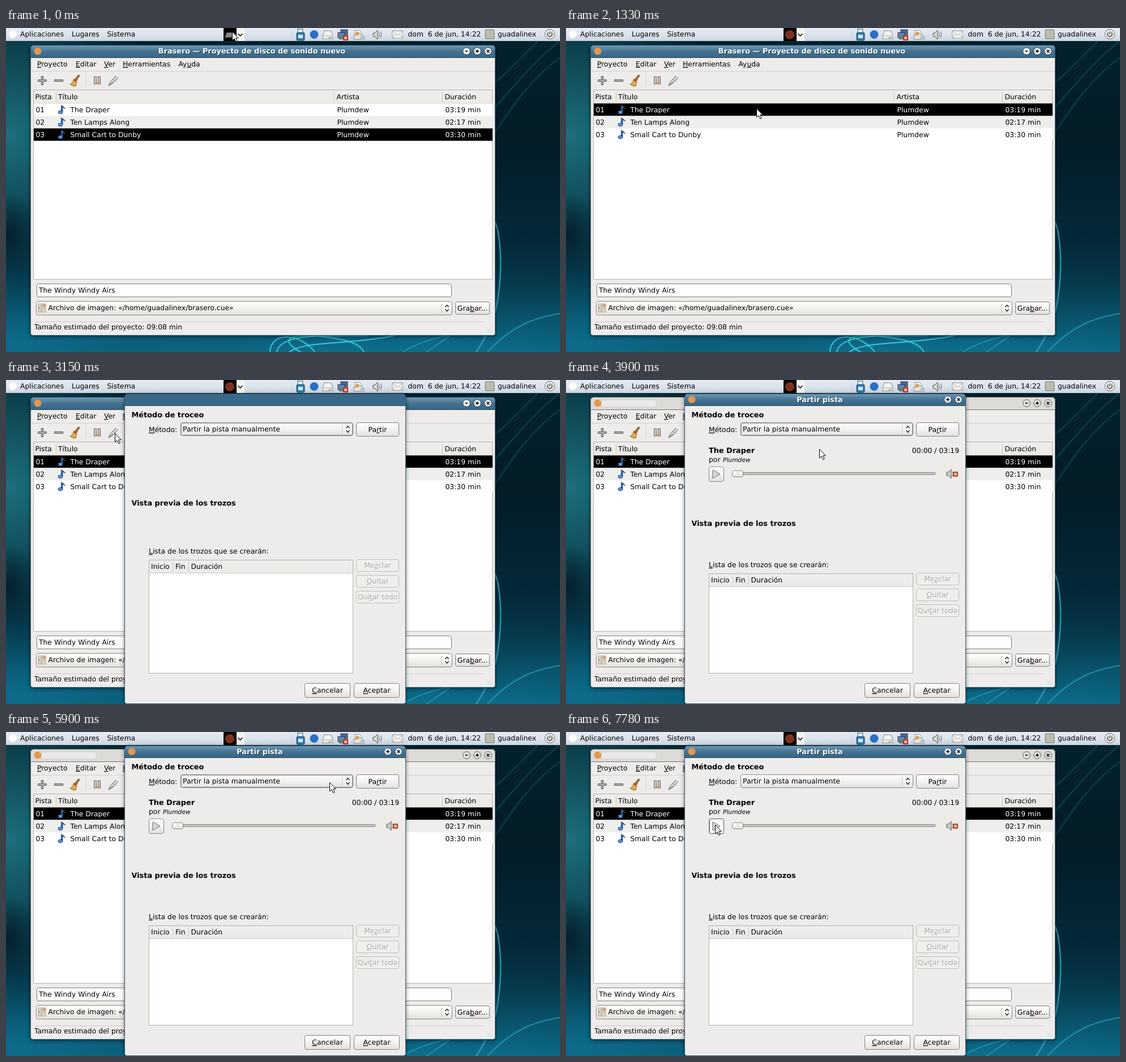
An HTML page for the animation above (8 s loop, 978x573 px).

```html
<!DOCTYPE html>
<html lang="es">
<head>
<meta charset="utf-8">
<title>Partir pista</title>
<style>
html, body { margin: 0; width: 100%; height: 100%; overflow: hidden; background: #04222e; }
svg { display: block; }
text { font-family: "DejaVu Sans", sans-serif; font-size: 12.35px; text-rendering: geometricPrecision; }
.b { font-weight: bold; font-size: 12.85px; }
.i { font-style: italic; font-size: 10.7px; }
.u { text-decoration: underline; }
</style>
</head>
<body>
<svg id="stage" width="978" height="573" viewBox="0 0 978 573"></svg>
<script>
const LOOP = 8000;
const ARTIST = 'Plumdew';
const TRACKS = [
  ['The Draper', '03:19 min'],
  ['Ten Lamps Along', '02:17 min'],
  ['Small Cart to Dunby', '03:30 min']
];
const METHODS = [
  'Partir la pista manualmente',
  'Partir la pista en partes con una longitud fija',
  'Partir la pista en un número fijo de partes',
  'Partir la pista para cada silencio'
];

// Drawing helpers; y of a text is its middle, "_" underlines the next letter.
const text = (x, y, s, more = '') =>
  `<text x="${x}" y="${Math.floor(y + 4.5)}" ${more}>${s.replace(/_(.)/, '<tspan class="u">$1</tspan>')}</text>`;
const bold = (x, y, s, more = '') => text(x, y, s, 'class="b" ' + more);
const rect = (x, y, w, h, fill, more = '') =>
  `<rect x="${x}" y="${y}" width="${w}" height="${h}" fill="${fill}" ${more}/>`;
const path = (d, fill, stroke = 'none', width = 1, more = '') =>
  `<path d="${d}" fill="${fill}" stroke="${stroke}" stroke-width="${width}" ${more}/>`;
const circle = (x, y, r, fill, more = '') => `<circle cx="${x}" cy="${y}" r="${r}" fill="${fill}" ${more}/>`;
const ellipse = (x, y, rx, ry, fill, more = '') =>
  `<ellipse cx="${x}" cy="${y}" rx="${rx}" ry="${ry}" fill="${fill}" ${more}/>`;
const group = (s, more = '') => `<g ${more}>${s}</g>`;
const at = (x, y, s) => group(s, `transform="translate(${x} ${y})"`);
const frame = (x, y, w, h, fill, stroke, r = 0, more = '') =>
  rect(x + .5, y + .5, w - 1, h - 1, fill, `stroke="${stroke}" rx="${r}" ${more}`);
const fade = (id, ...stops) => `<linearGradient id="${id}" x2="0" y2="1">` +
  stops.map((c, i) => `<stop offset="${i / (stops.length - 1)}" stop-color="${c}"/>`).join('') + '</linearGradient>';
const glow = (id, color, opacity) => `<radialGradient id="${id}"><stop stop-color="${color}" stop-opacity="${opacity}"/>` +
  `<stop offset="1" stop-color="${color}" stop-opacity="0"/></radialGradient>`;

const button = (x, y, w, h, label, off) => frame(x, y, w, h, off ? '#efeeec' : 'url(#btn)', off ? '#c2beb8' : '#857e75', 3) +
  (off ? text(x + w / 2 + 1, y + h / 2 + 1, label, 'fill="#fff" text-anchor="middle"') : '') +
  text(x + w / 2, y + h / 2, label, `text-anchor="middle" fill="${off ? '#aaa7a2' : '#000'}"`);
const arrows = (x, y) => path(`M${x - 3} ${y - 2}l3 -3.5l3 3.5M${x - 3} ${y + 2}l3 3.5l3 -3.5`, 'none', '#222', 1.4);
const combo = (x, y, w, h) => frame(x, y, w, h, 'url(#btn)', '#8b847b', 3) +
  path(`M${x + w - 19.5} ${y + 4}v${h - 8}`, 'none', '#c5c1bb') + arrows(x + w - 9.5, y + h / 2);

// Window outline and title bar with round top corners.
const outline = (x, y, w, h) => `M${x} ${y + h - 4}v${10 - h}q0 -6 6 -6h${w - 12}q6 0 6 6v${h - 10}q0 4 -4 4h${8 - w}q-4 0 -4 -4z`;
const titleBar = (x, y, w, h) => `M${x} ${y + h}v${6 - h}q0 -6 6 -6h${w - 12}q6 0 6 6v${h - 6}z`;

const GLYPHS = { down: 'M-3 -1h6l-3 3z', plus: 'M-3 0h6M0 -3v6', cross: 'M-2.4 -2.4l4.8 4.8M2.4 -2.4l-4.8 4.8' };
const control = (x, y, kind, active) => at(x, y,
  circle(0, 0, 6.3, active ? '#f6f5f3' : '#e6e4e1', `stroke="${active ? '#2b4458' : '#5c5a57'}"`) +
  path(GLYPHS[kind], kind === 'down' ? '#222' : 'none', '#222', kind === 'down' ? 0 : 1.8));
const titleText = (x, y, s) =>
  bold(x + 1, y + 1, s, 'text-anchor="middle" fill="#1c3d55"') + bold(x, y, s, 'text-anchor="middle" fill="#fff"');

function desktop() {
  const strokes = (list, color, width, opacity) =>
    list.map(d => path(d, 'none', color, width, `opacity="${opacity}"`)).join('');
  return rect(0, 0, 978, 573, 'url(#sky)') +
    ellipse(0, 190, 300, 260, 'url(#teal)') +
    ellipse(4, 365, 62, 75, 'url(#dark)') +
    ellipse(0, 560, 420, 130, 'url(#deep)') +
    ellipse(930, 600, 430, 140, 'url(#deep)') +
    ellipse(560, 600, 420, 90, 'url(#blue)') +
    strokes(['M978 23C930 60 895 105 855 150', 'M940 23C915 45 890 75 862 98', 'M978 52C940 80 900 125 860 190'], '#1d6572', 2, .5) +
    strokes(['M860 335C874 362 877 425 868 480C862 520 845 550 830 573'], '#2ba5b8', 2.5, .85) +
    strokes(['M978 505C930 512 890 530 850 573', 'M700 573C730 555 765 545 800 540', 'M742 573L790 540'], '#2ba5bd', 2, .7) +
    strokes(['M466 573C468 535 520 540 545 573', 'M478 573C485 538 570 545 640 544', 'M500 573C530 552 600 562 690 543',
      'M520 573C480 550 500 540 560 546C610 552 625 560 632 573'], '#3fd6e6', 2.2, .8);
}

function panel() {
  const right = [
    at(520, 12, rect(-5, -10, 9, 7, '#e9eef2', 'stroke="#315f80"') + rect(-7, -4, 14, 14, '#2f7fb0', 'rx="2" stroke="#174d73"') + rect(-4, 0, 8, 6, '#d5e8f4')),
    circle(544, 11.5, 7.5, '#2b6fc4'),
    at(568, 12, path('M-6 -7h12l3 9v5h-18v-5z', '#f0f0ee', '#8c8c88') + path('M-9 2h18', 'none', '#aaa') + rect(2, 4, 4, 1.5, '#5b9a3c')),
    at(595, 12, rect(-4, -9, 12, 9, '#456f9c', 'stroke="#333"') + rect(-9, -4, 12, 9, '#5b86b5', 'stroke="#333"') +
      rect(-7, 6, 8, 2, '#666') + rect(0, 1, 9, 9, '#c8361f') + path('M2.5 3.5l4 4m0 -4l-4 4', 'none', '#fff', 1.5)),
    at(623, 12, path('M-7 -8h8l4 4v6h-12z', '#efeeec', '#999') + path('M-9 8v-7h4l6 -4l8 6v5z', '#e5e3df', '#888') + circle(-3, -2, 3, '#e59a3c') + rect(2, 2, 5, 6, '#bfc3c9')),
    at(655, 12, path('M-7 -3h3l5 -5v16l-5 -5h-3z', '#d7d7d4', '#555') + path('M3 -4q3 4 0 8M6 -6q4 6 0 12', 'none', '#777', 1.2)),
    at(691, 11, rect(-9, -6, 18, 13, '#f6f4ee', 'stroke="#999"') + path('M-9 -6l9 8l9 -8M-9 7l6 -7M9 7l-6 -7', 'none', '#aaa')),
    at(854, 11, rect(-8, -8, 16, 16, '#b9bcae', 'stroke="#777b72" rx="1"')),
    at(960, 11, circle(0, 0, 8.5, '#e8e8e6', 'stroke="#666"') + path('M-2.5 -3a4 4 0 1 0 5 0M0 -5v5', 'none', '#444', 1.5))
  ].join('');
  return rect(0, 0, 978, 23, 'url(#panel)') + path('M0 23.5h978', 'none', '#0a2c38') + circle(12, 11, 7, '#fff') +
    text(25, 10.5, 'Aplicaciones') + text(116, 10.5, 'Lugares') + text(178.5, 10.5, 'Sistema') +
    rect(384, 0, 23, 23, '#000') + rect(407, 0, 14, 23, '#f5f3f0') + path('M409.5 10l4 4l4 -4', 'none', '#111', 1.6) +
    group(path('M390 8h12l-4 9h-12z', '#77756f') + path('M388 13h11M389 10h12', 'none', '#aaa89f'), 'id="idle"') +
    group(circle(395, 12, 8, '#7b321f', 'stroke="#60210f"'), 'id="rec"') +
    path('M503.5 3v18M506.5 3v18', 'none', '#aeb8c4', 1, 'stroke-dasharray="1 2"') + right +
    text(709.5, 10.5, 'dom\u00a0 6 de jun, 14:22') + text(868, 10.5, 'guadalinex');
}

const note = y => at(99, y, path('M-1.5 4v-11.5q4 1 7.5 6q-3 -3 -5 -2v8z', '#3566b8', '#24488f') +
  ellipse(-3, 4.5, 3.8, 2.9, '#5f93da', 'stroke="#24488f"'));

function row(i, selected) {
  const y = 133.5 + 22 * i, mid = y + 11, ink = `fill="${selected ? '#fff' : '#000'}"`;
  return rect(49, y, 810, 22, selected ? '#000' : i === 1 ? '#eeeeed' : '#fff') + text(52.5, mid, '0' + (i + 1), ink) + note(mid) +
    text(113.5, mid, TRACKS[i][0], ink) + text(584.5, mid, ARTIST, ink) + text(775.5, mid, TRACKS[i][1], ink);
}
const rows = chosen => TRACKS.map((_, i) => row(i, i === chosen)).join('');

function toolbar() {
  const grey = d => path(d, '#aeb0ac', '#555753', 1);
  return at(64, 93, grey('M-1.5 -7.5h3v6h6v3h-6v6h-3v-6h-6v-3h6z')) + at(93, 93, grey('M-7.5 -1.5h15v3h-15z')) +
    at(121, 93, path('M7 -10l2 1l-6 9l-3 -2z', '#9a6b35', '#6d451b') + path('M-1 -3l5 3q-1 6 -2 10q-6 0 -10 -3q5 -4 7 -10z', '#e2a852', '#9a6420') + path('M-1 -1l4 2', 'none', '#b33', 2)) +
    path('M141.5 82v22', 'none', '#d2cec8') +
    at(161, 93, rect(-5.5, -7, 4, 13, '#c9c9c5', 'stroke="#666"') + rect(1.5, -7, 4, 13, '#c9c9c5', 'stroke="#666"') + path('M-2 3h7l-3.5 5z', '#d69a4c')) +
    group(rect(176.5, 79.5, 27, 28, '#fbfaf9', 'rx="3" stroke="#b5afa7"'), 'id="hover"') +
    group(rect(176.5, 79.5, 27, 28, '#d4d1cc', 'rx="3" stroke="#8b857d"'), 'id="press"') +
    at(189, 93, path('M-8 9q3 -9 8 -11l3 3q-4 6 -11 8z', '#e6e6e3', '#666') + path('M0 -2l5 -6M3 1l6 -7M-8 9l8 -7', 'none', '#777', 1.2));
}

function mainWindow() {
  const header = [[51.5, 'Pista'], [92, 'Título'], [583.5, 'Artista'], [774.5, 'Duración']];
  const menu = [[55, '_Proyecto'], [123, '_Editar'], [173, '_Ver'], [206, '_Herramientas'], [304.5, 'Ay_uda']];
  const controls = active => control(813, 41, 'down', active) + control(832, 41, 'plus', active) + control(851, 41, 'cross', active);
  const bar = titleBar(43.5, 30.5, 820, 22);
  return group(path(outline(43.5, 30.5, 820, 513), '#edecea', '#4b5a63'), 'filter="url(#shadow)"') +
    group(path(bar, 'url(#title)', '#2c4f68') + titleText(434, 41, 'Brasero — Proyecto de disco de sonido nuevo') + controls(true), 'id="focused"') +
    group(path(bar, '#dddbd8', '#77746f') + rect(62, 35, 97, 13, '#ebe9e7', 'stroke="#cfccc8"') + controls(false), 'id="blurred"') +
    circle(56, 41, 6.5, '#e8964a') +
    menu.map(m => text(m[0], 64, m[1])).join('') + path('M45 76.5h818', 'none', '#d5d2cd') + toolbar() +
    frame(48, 109, 811, 336, '#fff', '#b9b1a7') + rect(49, 110, 809, 23, 'url(#head)') +
    path('M88.5 112v19M579.5 112v19M770.5 112v19', 'none', '#c9c5bf') + path('M49 133.5h809', 'none', '#c4bfb8') +
    header.map(h => text(h[0], 121.5, h[1])).join('') +
    group(rows(2), 'id="third"') + group(rows(0), 'id="first"') +
    frame(54, 452, 733, 24, '#fff', '#85796b', 3) + text(58, 463.5, 'The Windy Windy Airs') +
    combo(53, 483, 735, 25) +
    at(63, 495, rect(-6, -7, 13, 14, '#f3eee6', 'stroke="#9a8b78"') + circle(0, 0, 4.8, '#dedbd5', 'stroke="#8c857b"') + circle(0, 0, 1.5, '#fff', 'stroke="#999"') + circle(4, -4, 2.3, '#e39a3e')) +
    text(74.5, 495, 'Archivo de imagen: «/home/guadalinex/brasero.cue»') + button(793, 484, 61, 23, 'Gra_bar...') +
    path('M50 519.5h793', 'none', '#d0ccc6') + text(50, 529, 'Tamaño estimado del proyecto: 09:08 min') +
    path('M848 538l10 -10M852 538l6 -6M856 538l2 -2', 'none', '#bbb7b0', 1, 'stroke-dasharray="1 2"');
}

// Lower half of the dialog, which starts lower once the player is present.
function pieces(titleY, top) {
  return bold(221.5, titleY, 'Vista previa de los trozos') + text(252, top - 15, '_Lista de los trozos que se crearán:') +
    frame(252, top, 361, 519 - top, '#fff', '#b9b1a7') + rect(253, top + 1, 359, 22, 'url(#head)') +
    path(`M253 ${top + 23.5}h359M294.5 ${top + 3}v18M322.5 ${top + 3}v18`, 'none', '#cbc7c1') +
    text(256, top + 12, 'Inicio') + text(299, top + 12, 'Fin') + text(326.5, top + 12, 'Duración') +
    ['Me_zclar', '_Quitar', 'Qui_tar todo'].map((s, i) => button(618, top - 1 + 28 * i, 76, 22, s, true)).join('');
}

function player() {
  return bold(252, 124.5, TRACKS[0][0]) + text(252, 140.5, 'por') + text(277, 140.5, ARTIST, 'class="i"') +
    text(694, 124.5, '00:00 / 03:19', 'text-anchor="end"') +
    frame(252, 153, 27, 27, 'url(#btn)', '#8b847b', 3) +
    group(frame(252, 153, 27, 27, '#d3d0cb', '#77716a', 3), 'id="playDown"') +
    group(frame(253, 153, 26, 27, '#fbfaf9', '#2e2a26', 2, 'stroke-dasharray="2 1"'), 'id="playFocus"') +
    path('M259 159l13 7.5l-13 7.5z', '#d9d8d5', '#666') +
    frame(293, 163, 360, 5, '#c7c4bf', '#8e8982', 2) + frame(293, 160, 20, 12, 'url(#btn)', '#8b847b', 3) +
    path('M303.5 163v6', 'none', '#c9c5bf') +
    at(681, 166, path('M-9 -3h3l5 -5v16l-5 -5h-3z', '#cfcecb', '#555') + path('M1 -4q2.5 4 0 8', 'none', '#777', 1.2) +
      rect(2, -4, 9, 9, '#b8462e', 'rx="1"') + path('M4.5 -1.5l4 4m0 -4l-4 4', 'none', '#fff', 1.4));
}

function dialog() {
  const bar = titleBar(209.5, 24.5, 496, 21);
  return group(path(outline(209.5, 24.5, 496, 548), '#edecea', '#2f5872'), 'filter="url(#shadow)"') +
    path(bar, '#3a6889', '#2c4f68') +
    bold(221.5, 61.5, 'Método de troceo') + text(252, 87.5, '_Método:') +
    combo(308, 75, 305, 24) + group(frame(309, 76, 303, 22, 'none', '#4a443d', 2, 'stroke-dasharray="1 1"'), 'id="comboFocus"') +
    text(312, 87, METHODS[0]) + button(618, 75, 76, 25, 'Pa_rtir') +
    button(527, 536, 81, 26, '_Cancelar') + button(614, 536, 81, 26, '_Aceptar') +
    group(pieces(217.5, 318), 'id="blank"') +
    group(path(bar, 'url(#title)', '#2c4f68') + titleText(448, 34.5, 'Partir pista') + circle(222, 34.5, 6.5, '#e8964a') +
      control(674, 34.5, 'plus', true) + control(693, 34.5, 'cross', true) + player() + pieces(254, 342), 'id="filled"');
}

function popup() {
  return group(frame(308, 72, 305, 104, '#fff', '#a8a39c'), 'filter="url(#shadow)"') + rect(309, 73, 303, 25.5, '#000') +
    METHODS.map((s, i) => text(315, 85.5 + 25.7 * i, s, `fill="${i ? '#000' : '#fff'}"`)).join('');
}

const defs = fade('panel', '#e4ebf4', '#dce4ee', '#ccd5e0') + fade('title', '#6f9ab8', '#44728f', '#386585') + fade('btn', '#fff', '#f3f2f0', '#e3e1dd') +
  fade('head', '#efeeec', '#ebeae7') + fade('sky', '#03232e', '#031c26', '#04293a', '#0a536d') +
  glow('teal', '#1f7a88', .9) + glow('dark', '#02202b', .95) + glow('deep', '#0f86a6', .55) + glow('blue', '#0f86a6', .75) +
  '<filter id="shadow" x="-5%" y="-10%" width="110%" height="120%"><feDropShadow dx="0" dy="2" stdDeviation="3.5" flood-opacity=".5"/></filter>';

document.getElementById('stage').innerHTML = `<defs>${defs}</defs>` + desktop() + panel() + mainWindow() +
  group(dialog(), 'id="dialog"') + group(popup(), 'id="popup"') +
  group(path('M.5 .5v15.5l3.6 -3.3l2.5 5.8l2.6 -1.1l-2.5 -5.6h4.6z', '#fff', '#000', 1), 'id="cursor"');

// Visible spans in ms.
const SPANS = {
  idle: [0, 170], rec: [170, LOOP], third: [0, 1330], first: [1330, LOOP],
  hover: [2450, 2890], press: [2890, 3050], focused: [0, 3260], blurred: [3260, LOOP],
  dialog: [3050, LOOP], blank: [3050, 3260], filled: [3260, LOOP],
  popup: [4700, 5860], comboFocus: [3050, 7660], playDown: [7660, 7780], playFocus: [7780, LOOP]
};
// Pointer stops: time, x, y, easing into the stop.
const inOut = p => p * p * (3 - 2 * p), out = p => p * (2 - p), into = p => p * p, even = p => p;
const STOPS = [
  [0, 399, 6], [130, 399, 6, even], [970, 338, 143, inOut], [1050, 338, 143, even], [1130, 336, 142, even],
  [1610, 336, 142, even], [2450, 204, 97, inOut], [2650, 192, 94, out], [3260, 192, 94, even],
  [3820, 400, 132, into], [4460, 601, 90, out], [4980, 601, 90, even], [5140, 606, 94, inOut],
  [5500, 567, 89, inOut], [5620, 571, 89, out], [6380, 571, 89, even], [7220, 269, 163, inOut],
  [7300, 263, 164, even], [LOOP, 263, 164, even]
];
const STEP = 40;
const nodes = Object.fromEntries([...Object.keys(SPANS), 'cursor'].map(id => [id, document.getElementById(id)]));

function draw(t) {
  for (const [id, [from, to]] of Object.entries(SPANS))
    nodes[id].setAttribute('display', t >= from && t < to ? 'inline' : 'none');
  const offset = t < 3150 ? 10 : 20;
  const tick = Math.max(0, Math.floor((t - offset) / STEP) * STEP + offset);
  const next = STOPS.findIndex(s => s[0] > tick);
  const [t0, x0, y0] = STOPS[next - 1], [t1, x1, y1, ease] = STOPS[next];
  const p = ease((tick - t0) / (t1 - t0));
  nodes.cursor.setAttribute('transform', `translate(${Math.round(x0 + (x1 - x0) * p)} ${Math.round(y0 + (y1 - y0) * p)})`);
}

const start = performance.now();
function loop() {
  draw((performance.now() - start) % LOOP);
  requestAnimationFrame(loop);
}
loop();
</script>
</body>
</html>
```
